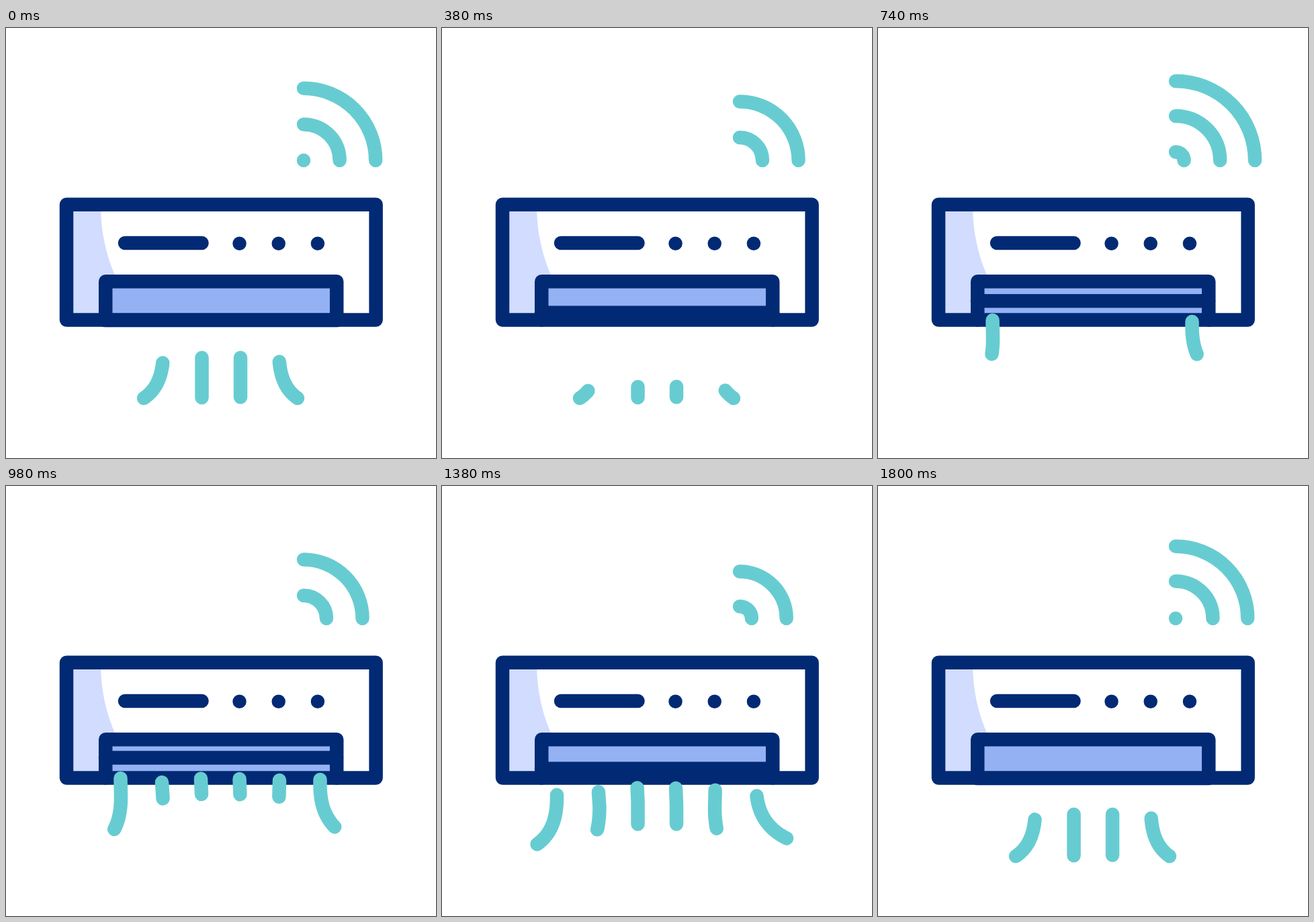
Recreate the animation shown at these times as an HTML page with a canvas. Size 640x640 px, loop 1820 ms.

```html
<!DOCTYPE html>
<html>
<head>
<meta charset="utf-8">
<title>Air conditioner</title>
<style>
html, body { margin: 0; width: 100%; height: 100%; overflow: hidden; background: #fff; }
canvas { display: block; width: 640px; height: 640px; }
</style>
</head>
<body>
<canvas id="stage" width="640" height="640"></canvas>
<script>
const ctx = document.getElementById('stage').getContext('2d');
const LOOP = 1820, STEP = 20, LINE = 20.5;
const NAVY = '#022a74', TEAL = '#67ccd1', BLUE = '#93b1f3', PALE = '#d1dcff';

// Progress of t between two times, held at both ends
const part = (t, from, to) => Math.min(1, Math.max(0, (t - from) / (to - from)));
const swing = p => 0.5 - 0.5 * Math.cos(Math.PI * p);

// A stream of air: a straight lead from the slot, then a bend to the end point
function stream(top, lead, end) {
  const dx = end[0] - lead[0], h = end[1] - lead[1];
  const pts = [{ x: top[0], y: top[1], len: 0 }];
  for (let i = 0; i <= 60; i++) {
    const s = i / 60, q = 1 - s;
    const x = lead[0] + dx * (0.33 * 3 * q * s * s + s * s * s);
    const y = lead[1] + h * (0.52 * 3 * q * q * s + 0.82 * 3 * q * s * s + s * s * s);
    const last = pts[pts.length - 1];
    pts.push({ x, y, len: last.len + Math.hypot(x - last.x, y - last.y) });
  }
  return pts;
}

const outer = [
  stream([170.5, 435], [171, 463], [132, 539]),
  stream([467.5, 437], [467.5, 445], [523, 529])
];
const inner = [
  stream([232, 441], [234.4, 478], [205, 551]),
  stream([290, 435.5], [291.5, 470], [291.5, 550]),
  stream([347.5, 436], [349, 475], [349, 549.5]),
  stream([407, 438], [406, 479], [434, 551])
];
const waveStarts = [-1200, -600, 0, 600, 1180, 1800];

function pointAt(pts, len) {
  let i = 1;
  while (i < pts.length - 1 && pts[i].len < len) i++;
  const p = pts[i - 1], n = pts[i], k = part(len, p.len, n.len);
  return [p.x + (n.x - p.x) * k, p.y + (n.y - p.y) * k];
}

function drawTrim(pts, from, to) {
  if (to <= from) return;
  const total = pts[pts.length - 1].len, a = from * total, b = to * total;
  ctx.beginPath();
  ctx.moveTo(...pointAt(pts, a));
  for (const p of pts) if (p.len > a && p.len < b) ctx.lineTo(p.x, p.y);
  ctx.lineTo(...pointAt(pts, b));
  ctx.stroke();
}

function line(x1, y1, x2, y2) {
  ctx.beginPath();
  ctx.moveTo(x1, y1);
  ctx.lineTo(x2, y2);
  ctx.stroke();
}

function dot(x, y) {
  ctx.beginPath();
  ctx.arc(x, y, LINE / 2, 0, Math.PI * 2);
  ctx.fill();
}

function drawUnit(t) {
  ctx.fillStyle = PALE;
  ctx.beginPath();
  ctx.moveTo(92, 265);
  ctx.lineTo(141, 265);
  ctx.quadraticCurveTo(141, 322, 164, 372);
  ctx.lineTo(164, 434);
  ctx.lineTo(92, 434);
  ctx.fill();

  ctx.fillStyle = BLUE;
  ctx.fillRect(148, 377.3, 344, 57);

  // The slat rises and falls inside the outlet
  ctx.strokeStyle = ctx.fillStyle = NAVY;
  const y = 435 - 30.5 * (swing(part(t, 30, 870)) - swing(part(t, 1000, 1730)));
  line(148, y, 492, y);

  ctx.beginPath();
  ctx.moveTo(148.2, 434.5);
  ctx.lineTo(148.2, 377.3);
  ctx.lineTo(492.2, 377.3);
  ctx.lineTo(492.2, 434.5);
  ctx.stroke();
  ctx.strokeRect(90, 262.7, 460.6, 171.9);

  line(177, 320, 291.5, 320);
  for (let i = 0; i < 3; i++) dot(347.5 + 58.2 * i, 320.7);
}

function drawWaves(t) {
  for (const start of waveStarts) {
    const age = t - start;
    if (age < 0 || age > 1345) continue;
    const r = Math.min(118, age * 0.0893);
    if (r === 0) {
      dot(443, 197);
      continue;
    }
    ctx.beginPath();
    ctx.arc(443, 197, r, -Math.PI / 2, 0);
    ctx.stroke();
  }
}

function drawAir(t) {
  const head = 1 - (1 - part(t, 397, 1817)) ** 2;
  const tail = part(t, 1067, 1751) ** 2;
  for (const s of outer) drawTrim(s, tail, head);

  // The inner streams fade out in the next round
  const u = t < 600 ? t + LOOP : t;
  const p = part(u, 1207, 2327);
  for (const s of inner) drawTrim(s, p * (0.74 + 0.26 * p), part(u, 770, 1800));
}

function draw(t) {
  ctx.fillStyle = '#fff';
  ctx.fillRect(0, 0, 640, 640);
  ctx.lineWidth = LINE;
  ctx.lineCap = ctx.lineJoin = 'round';
  drawUnit(t);
  ctx.strokeStyle = ctx.fillStyle = TEAL;
  drawWaves(t);
  drawAir(t);
}

const begin = performance.now();
function tick() {
  const t = (performance.now() - begin) % LOOP;
  draw(Math.floor(t / STEP) * STEP);
  requestAnimationFrame(tick);
}
tick();
</script>
</body>
</html>
```
